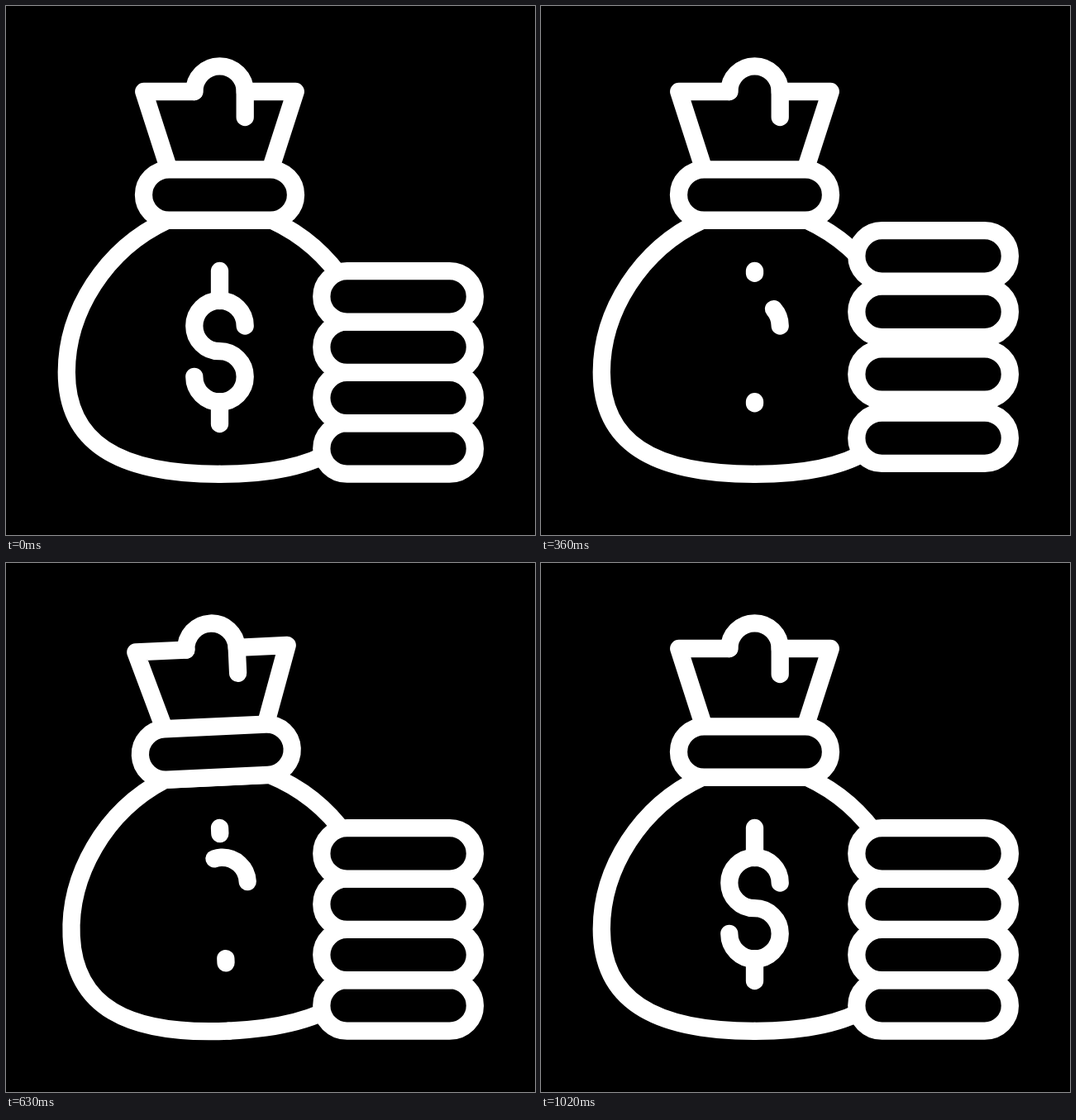
Animation of 640 by 640 pixels, one loop 1050 ms. Source, as an HTML page with a canvas:

```html
<!DOCTYPE html>
<html lang="en">
<head>
<meta charset="utf-8">
<title>Money bag</title>
<style>
  html, body { margin: 0; width: 100%; height: 100%; overflow: hidden; background: #000; }
  canvas { display: block; width: 100vmin; height: 100vmin; }
</style>
</head>
<body>
<canvas id="stage" width="640" height="640"></canvas>
<script>
const ctx = document.getElementById('stage').getContext('2d');
const LOOP = 1050, STEP = 30;
const CX = 258.5, R = 30.7, TAU = Math.PI * 2;
const COIN_X = 474.6, COIN_Y = 535.4, COIN_GAP = 61.33;

const linear = p => p;
const smooth = p => p * p * (3 - 2 * p);

// keys: [time, value] pairs in order of time
function track(keys, t, ease = smooth) {
  if (t <= keys[0][0]) return keys[0][1];
  for (let i = 1; i < keys.length; i++) {
    const [t0, v0] = keys[i - 1], [t1, v1] = keys[i];
    if (t <= t1) return v0 + (v1 - v0) * ease((t - t0) / (t1 - t0));
  }
  return keys[keys.length - 1][1];
}

const SWAY = [[390, 0], [600, -3.35], [750, 3.5], [960, 0]];
const SIGN = [[0, 1], [390, 0], [540, 0], [1000, 1]];
const HOP = [[0, 0], [180, -49], [450, 0]];
const TOP_HOP = [[180, 0], [360, -49], [450, -49], [630, 0]];
const TOP_TILT = [[360, 0], [495, 40], [630, 0]];

function stroke(draw) {
  ctx.beginPath();
  draw();
  ctx.stroke();
}

function line(...pts) {
  stroke(() => pts.forEach(([x, y]) => ctx.lineTo(x, y)));
}

function pill(w) {
  const h = w / 2 - R;
  ctx.beginPath();
  ctx.arc(-h, 0, R, Math.PI / 2, Math.PI * 1.5);
  ctx.arc(h, 0, R, -Math.PI / 2, Math.PI / 2);
  ctx.closePath();
  ctx.fill();
  ctx.stroke();
}

function at(x, y, deg, draw) {
  ctx.save();
  ctx.translate(x, y);
  ctx.rotate(deg * Math.PI / 180);
  draw();
  ctx.restore();
}

function half(side) {
  const x = d => CX + side * d;
  stroke(() => {
    ctx.moveTo(x(0), 259.3);
    ctx.lineTo(x(63.5), 259.3);
    ctx.bezierCurveTo(x(138.5), 294, x(185.2), 370, x(185.2), 443);
    ctx.bezierCurveTo(x(185.2), 527, x(125), 566.3, x(0), 566.3);
  });
  line([x(R), 103.5], [x(91.8), 103.5], [x(61.5), 197.5]);
}

function dollar(part) {
  if (part < 0.002) return;
  line([CX, 320.5], [CX, 320.5 + 36 * part]);
  line([CX, 478.7], [CX, 478.7 + 26.8 * part]);
  const sweep = part * TAU * 1.5, turn = TAU * 0.75;
  stroke(() => {
    ctx.arc(CX, 387, R, 0, -Math.min(sweep, turn), true);
    if (sweep > turn) ctx.arc(CX, 387 + 2 * R, R, -TAU / 4, sweep - turn - TAU / 4);
  });
}

function bag(t) {
  at(CX, 320, track(SWAY, t), () => {
    ctx.translate(-CX, -320);
    half(-1);
    half(1);
    stroke(() => {
      ctx.arc(CX, 103.5, R, Math.PI, 0);
      ctx.lineTo(CX + R, 134.5);
    });
    at(CX, 228.5, 0, () => pill(184));
    dollar(track(SIGN, t, linear));
  });
}

function coins(t) {
  for (let i = 0; i < 4; i++) {
    const top = i === 3;
    const hop = top ? track(TOP_HOP, t) : track(HOP, t - 60 * i);
    const tilt = top ? track(TOP_TILT, t) : 0;
    at(COIN_X, COIN_Y - COIN_GAP * i + hop, tilt, () => pill(185.6));
  }
}

function render(t) {
  ctx.fillStyle = '#000';
  ctx.fillRect(0, 0, 640, 640);
  ctx.strokeStyle = '#fff';
  ctx.lineWidth = 21.3;
  ctx.lineCap = ctx.lineJoin = 'round';
  bag(t);
  coins(t);
}

const start = performance.now();
function tick(now) {
  const t = Math.max(0, now - start) % LOOP;
  render(Math.floor(t / STEP) * STEP);
  requestAnimationFrame(tick);
}
render(0);
requestAnimationFrame(tick);
</script>
</body>
</html>
```
